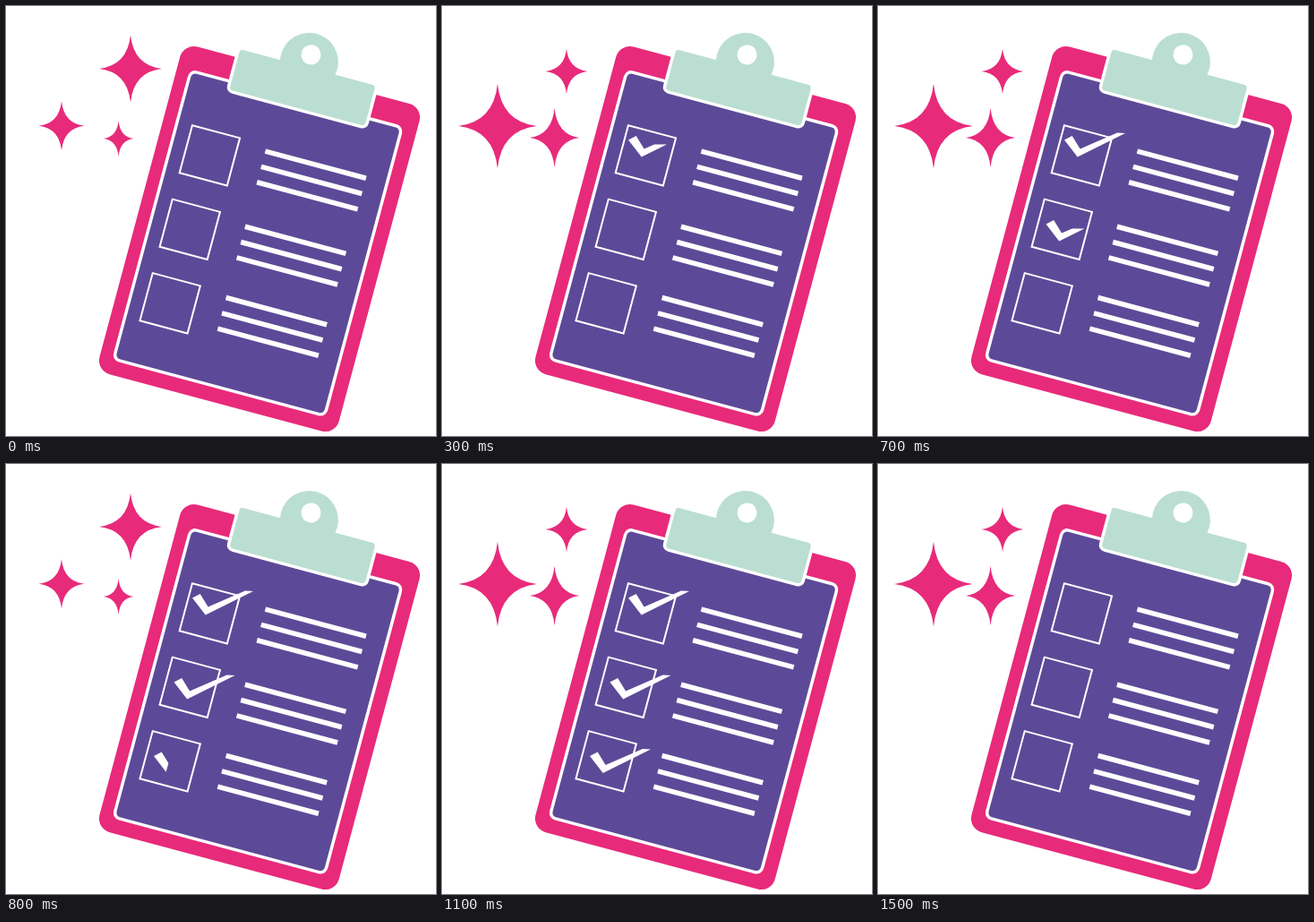
Write an HTML page with a canvas that moves like this. It is 480 px wide and 480 px high and loops after 1.6 s.

```html
<!DOCTYPE html>
<html lang="en">
<head>
<meta charset="utf-8">
<title>Checklist</title>
<style>
  html, body { margin: 0; width: 100%; height: 100%; overflow: hidden; background: #fff; }
  canvas { display: block; width: 480px; height: 480px; }
</style>
</head>
<body>
<canvas id="stage" width="480" height="480"></canvas>
<script>
const ctx = document.getElementById('stage').getContext('2d');
const PINK = '#e82a7a', PURPLE = '#5c4a98', MINT = '#bbded2', WHITE = '#fff';
const LOOP = 1600, STEP = 100, CLEAR_STEP = 14, TILT = Math.PI / 12;

// Every star alternates between two heights and two reaches
const STARS = [
  { x: 139, y: [70, 73], reach: [35, 23.5], aspect: 1.07 },
  { x: 62, y: [133.7, 134], reach: [25.5, 43.7], aspect: 1.08 },
  { x: 125.6, y: [148, 147], reach: [16.7, 27.7], aspect: 1.2 }
];

const ROWS = [
  { lines: 81.7, tick: [208, 149.5], start: 1 },
  { lines: 168.8, tick: [187.5, 243.5], start: 5 },
  { lines: 250.9, tick: [165, 326], start: 7 }
];

// The two edges of a tick, relative to its left end
const LOWER = [[0, 0], [14.7, 19], [68, -7.5]];
const UPPER = [[8.7, -4.5], [17.6, 10], [59, -8]];

const lerp = (a, b, t) => a + (b - a) * t;

function roundRect(x, y, w, h, r) {
  ctx.beginPath();
  ctx.roundRect(x, y, w, h, r);
}

function fill(color) {
  ctx.fillStyle = color;
  ctx.fill();
}

function outline(color, width) {
  ctx.strokeStyle = color;
  ctx.lineWidth = width;
  ctx.stroke();
}

function disc(x, y, r, color) {
  ctx.beginPath();
  ctx.arc(x, y, r, 0, Math.PI * 2);
  fill(color);
}

function drawBoard() {
  ctx.save();
  ctx.rotate(TILT);
  roundRect(202.3, -11.3, 276.7, 378.5, 16);
  fill(PINK);
  roundRect(219.8, 18.2, 240.5, 329.7, 5);
  outline(WHITE, 7);
  fill(PURPLE);

  roundRect(265, -21, 156.5, 46.7, 4);
  outline(WHITE, 7);
  fill(MINT);
  disc(343, -27.3, 32.5, MINT);
  disc(343, -35.5, 11, WHITE);

  ROWS.forEach(({ lines }, i) => {
    roundRect(235.3, 74.8 + i * 85.4, 55, 55, 0);
    outline(WHITE, 2);
    ctx.fillStyle = WHITE;
    for (let n = 0; n < 3; n++) ctx.fillRect(321.5, lines + n * 17.9 - 2.8, 116.5, 5.6);
  });
  ctx.restore();
}

function drawStar({ x, y, reach, aspect }, pose) {
  const pinch = 0.1, quarter = Math.PI / 2;
  ctx.save();
  ctx.translate(x, y[pose]);
  ctx.scale(reach[pose], reach[pose] * aspect);
  ctx.beginPath();
  ctx.moveTo(1, 0);
  for (let i = 0; i < 4; i++) {
    ctx.quadraticCurveTo(pinch, pinch, 0, 1);
    ctx.rotate(quarter);
  }
  fill(PINK);
  ctx.restore();
}

// Points of an edge up to the given progress, from 0 to 2
function trace(edge, progress, ease) {
  const leg = progress > 1 ? 1 : 0;
  const t = ease(progress - leg);
  const [from, to] = [edge[leg], edge[leg + 1]];
  return [...edge.slice(0, leg + 1), [lerp(from[0], to[0], t), lerp(from[1], to[1], t)]];
}

function drawTick([left, top], progress) {
  const lower = trace(LOWER, progress, t => t);
  const upper = trace(UPPER, progress, t => t * t);
  ctx.beginPath();
  for (const [x, y] of [...lower, ...upper.reverse()]) ctx.lineTo(left + x, top + y);
  fill(WHITE);
}

function drawTicks(step) {
  if (step >= CLEAR_STEP) return;
  for (const { tick, start } of ROWS) {
    if (step < start) return;
    const progress = Math.min(2, 0.33 + 0.6 * (step - start));
    drawTick(tick, progress);
    if (progress < 2) return; // the next row waits for this one
  }
}

function draw(time) {
  const step = Math.floor((time % LOOP) / STEP);
  ctx.fillStyle = WHITE;
  ctx.fillRect(0, 0, 480, 480);
  drawBoard();
  for (const star of STARS) drawStar(star, Math.floor(step / 2) % 2);
  drawTicks(step);
}

let origin = null;
function frame(now) {
  origin ??= now;
  draw(now - origin);
  requestAnimationFrame(frame);
}
draw(0);
requestAnimationFrame(frame);
</script>
</body>
</html>
```
